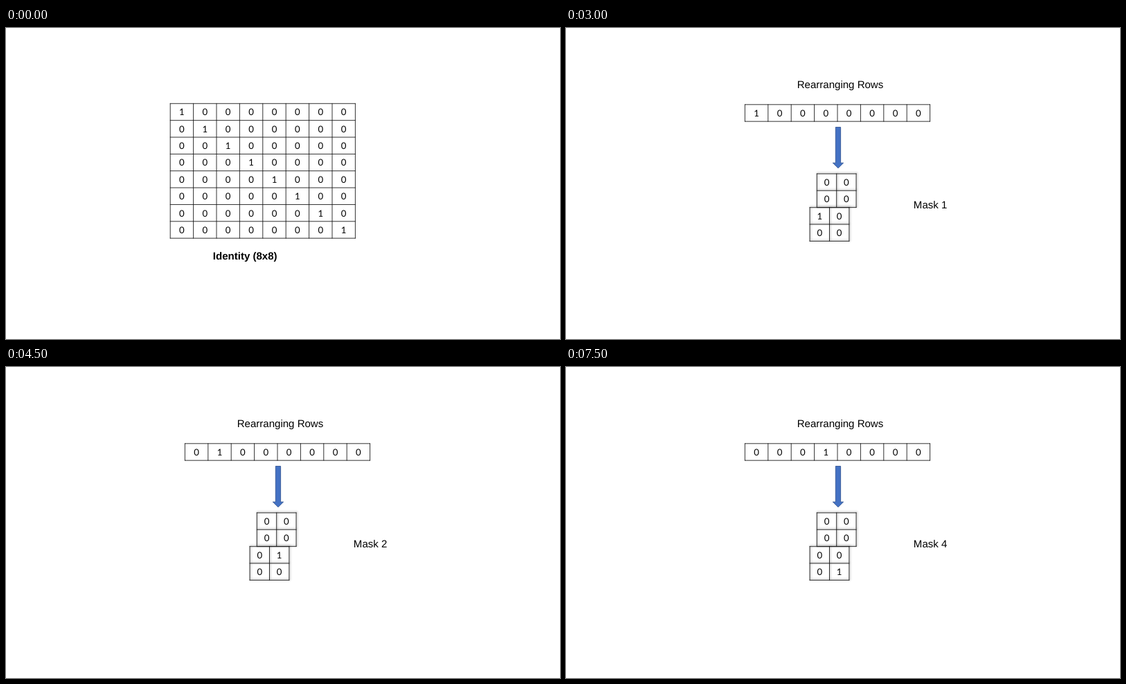
Write an HTML page that moves like this. It is 800 px wide and 450 px high and loops after 8 s.

```html
<!DOCTYPE html>
<html lang="en">
<head>
<meta charset="utf-8">
<title>Identity rows to masks</title>
<style>
  html, body { margin: 0; width: 100%; height: 100%; overflow: hidden; background: #fff; }
  svg { display: block; width: 100vw; height: 100vh; }
  text {
    font: 15.04px "Liberation Sans", Arial, sans-serif;
    text-anchor: middle; text-rendering: geometricPrecision; fill: #000;
  }
  .digit { font: 13.2px Lato, Carlito, sans-serif; }
  .bold { font-weight: bold; }
  .lines { fill: none; stroke: #111; stroke-width: .86; }
  .raised { filter: url(#shade); }
  .arrow { fill: #4472c4; stroke: #2f528f; stroke-width: .84; }
</style>
</head>
<body>
<svg id="stage" viewBox="0 0 800 450">
  <defs>
    <filter id="shade" x="-20%" y="-20%" width="140%" height="140%">
      <feDropShadow dx="1" dy="-1" stdDeviation="1.6" flood-color="#000" flood-opacity=".4"/>
    </filter>
  </defs>
</svg>
<script>
const SCENE_MS = 1500, LOOP_MS = 8000;
const ROW_H = 24.36, WIDE = 33.4, NARROW = 28.4;
const stage = document.getElementById('stage');

const label = (text, x, y, cls = '') => `<text x="${x}" y="${y}" class="${cls}">${text}</text>`;
const arrow = points => `<polygon class="arrow" points="${points}"/>`;
const unitRow = (length, one) => Array.from({ length }, (_, i) => i === one ? 1 : 0);
const identity = Array.from({ length: 8 }, (_, i) => unitRow(8, i));

function table(x, y, rows, cellW, cls = '') {
  const cols = rows[0].length;
  const width = cols * cellW, height = rows.length * ROW_H;
  let path = '', digits = '';
  for (let i = 0; i <= cols; i++) path += `M${x + i * cellW} ${y - .4}v${height + .8}`;
  for (let j = 0; j <= rows.length; j++) path += `M${x - .4} ${y + j * ROW_H}h${width + .8}`;
  rows.forEach((row, j) => row.forEach((value, i) => {
    digits += label(value, x + (i + .5) * cellW, y + j * ROW_H + 17.1, 'digit');
  }));
  return `<g class="${cls}"><path class="lines" d="${path}"/></g>${digits}`;
}

function identityScene() {
  return table(237.2, 109.3, identity, WIDE) + label('Identity (8x8)', 345.2, 335, 'bold');
}

function rowScene() {
  return label('Consider Rows One by One', 396.2, 87)
    + arrow('199.5,129.8 247,129.8 247,126.5 254,133.3 247,140.1 247,136.8 199.5,136.8')
    + `<rect x="262.8" y="146.1" width="267.2" height="170.5" fill="#7f7f7f"/>`
    + table(262.8, 121.8, identity, WIDE);
}

function maskScene(index) {
  const row = unitRow(8, index);
  return label('Rearranging Rows', 396, 87)
    + table(258.4, 110.8, [row], WIDE)
    + arrow('389.3,143.5 396.6,143.5 396.6,195.2 400.6,195.2 393,202.8 385.3,195.2 389.3,195.2')
    + table(362.3, 210.9, [row.slice(4, 6), row.slice(6)], NARROW, 'raised')
    + table(352.1, 259.7, [row.slice(0, 2), row.slice(2, 4)], NARROW, 'raised')
    + label(`Mask ${index + 1}`, 526.1, 261);
}

const scenes = [identityScene(), rowScene(), ...[0, 1, 2, 3].map(maskScene)].map(markup => {
  const group = document.createElementNS('http://www.w3.org/2000/svg', 'g');
  group.innerHTML = markup;
  return stage.appendChild(group);
});

const start = performance.now();
function draw(now) {
  const time = Math.max(0, now - start) % LOOP_MS;
  const current = Math.floor(time / SCENE_MS);
  scenes.forEach((scene, i) => { scene.style.display = i === current ? '' : 'none'; });
  requestAnimationFrame(draw);
}
draw(start);
</script>
</body>
</html>
```
